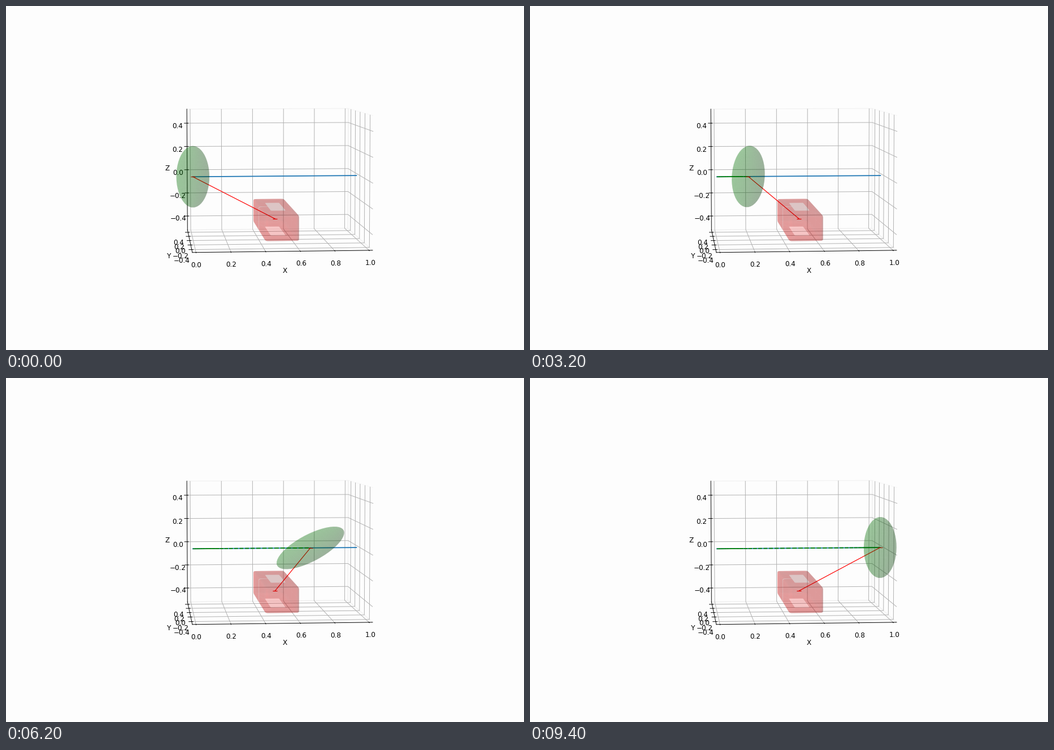
These frames come from a looping animation (917x611 px, 9.6 s). A matplotlib script:

```python
import numpy as np
import matplotlib.pyplot as plt
from matplotlib.animation import FuncAnimation

WIDTH, HEIGHT, DPI = 917, 611, 86
FRAMES, INTERVAL = 48, 200
PAD = 1 / 48
BOX_CENTER = (0.5, 0, -0.35)


def signed_pow(values, exponent):
    return np.sign(values) * np.abs(values) ** exponent


def superquadric(radii, exponent):
    """Closed surface: an ellipsoid for exponent 1, a rounded box near 0."""
    eta = np.linspace(-1.5705, 1.5705, 25)[:, None]
    omega = np.linspace(-np.pi, np.pi, 49)[None, :]
    ring = signed_pow(np.cos(eta), exponent)
    x = radii[0] * ring * signed_pow(np.cos(omega), exponent)
    y = radii[1] * ring * signed_pow(np.sin(omega), exponent)
    z = radii[2] * signed_pow(np.sin(eta), exponent) * np.ones_like(omega)
    return x, y, z


def position(i):
    """Quintic ease along the x axis."""
    s = i / 50
    return 10 * s**3 - 15 * s**4 + 6 * s**5


def tilt(i):
    """Lean over while passing the box, then straighten up again."""
    return np.radians(70) / np.cosh((i - 28.15) / 5.15) ** 2


def draw_surface(x, y, z, color):
    return ax.plot_surface(x, y, z, color=color, alpha=0.22,
                           rstride=1, cstride=1, linewidth=0)


fig = plt.figure(figsize=(WIDTH / DPI, HEIGHT / DPI), dpi=DPI,
                 facecolor="#fdfdfd")
ax = fig.add_subplot(projection="3d", facecolor="#fdfdfd")
ax.view_init(elev=5, azim=-95)
ax.set(xlabel="X", ylabel="Y", zlabel="Z")
ax.set_xticks(np.linspace(0, 1, 6))
ax.set_yticks(np.linspace(-0.4, 0.4, 5))
ax.set_zticks(np.linspace(-0.4, 0.4, 5))
ax.set_xlim(-PAD, 1 + PAD)
ax.set_ylim(-0.5 - PAD, 0.5 + PAD)
ax.set_zlim(-0.5 - PAD, 0.5 + PAD)
for axis in (ax.xaxis, ax.yaxis, ax.zaxis):
    axis.pane.set_fill(False)

ax.plot([0, 1], [0, 0], [0, 0], color="C0")

# One short dashed piece per step, so the dash pattern restarts each time.
trail = [ax.plot([position(i), position(i + 1)], [0, 0], [0, 0], "g--")[0]
         for i in range(FRAMES - 1)]
link, = ax.plot([0, 0.5], [0, 0], [0, -0.35], color="r", lw=1, marker="_")

bx, by, bz = superquadric((0.1, 0.5, 0.1), 0.1)
draw_surface(bx + BOX_CENTER[0], by + BOX_CENTER[1], bz + BOX_CENTER[2], "r")

body = superquadric((0.1, 0.1, 0.25), 1)
probe = []


def update(i):
    while probe:
        probe.pop().remove()
    x, y, z = body
    center, angle = position(i), tilt(i)
    c, s = np.cos(angle), np.sin(angle)
    probe.append(draw_surface(center + x * c + z * s, y, z * c - x * s, "g"))
    link.set_data_3d([center, BOX_CENTER[0]], [0, BOX_CENTER[1]],
                     [0, BOX_CENTER[2]])
    for k, piece in enumerate(trail):
        piece.set_visible(k < i)
    return []


def reset():
    return update(0)


anim = FuncAnimation(fig, update, frames=FRAMES, interval=INTERVAL,
                     init_func=reset, repeat=True, repeat_delay=0, blit=False)
plt.show()
```
